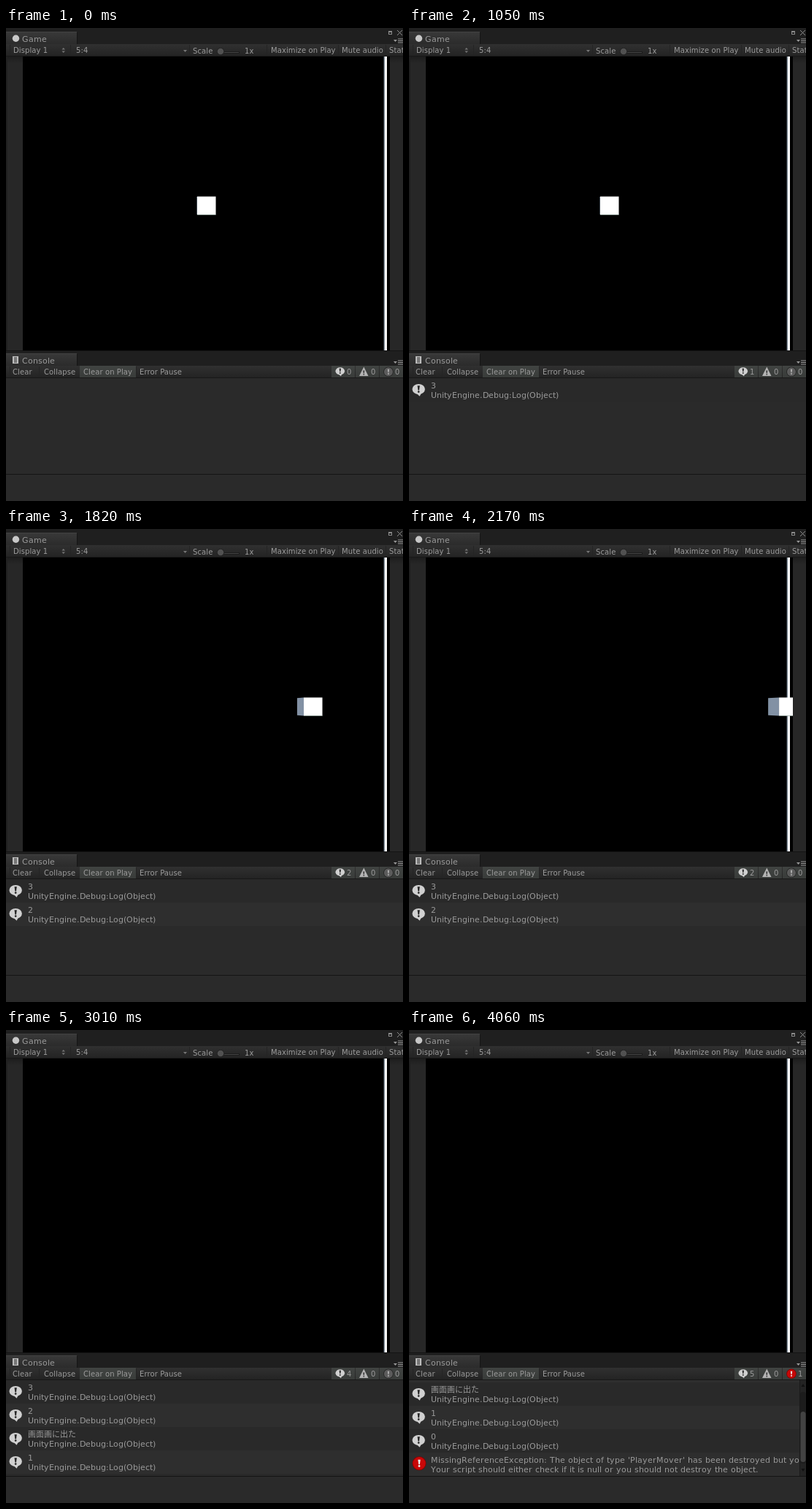
These frames come from a looping animation (544x647 px, 5320 ms). An HTML page with a canvas:

```html
<!DOCTYPE html>
<html lang="en">
<head>
<meta charset="utf-8">
<style>
html, body { margin: 0; width: 100%; height: 100%; overflow: hidden; background: #292929; }
canvas { display: block; }
</style>
</head>
<body>
<canvas id="stage" width="544" height="647"></canvas>
<script>
const g = document.getElementById('stage').getContext('2d');
const LOOP = 5320, STEP = 70;
const FONT = 'px "DejaVu Sans", "Noto Sans CJK JP", "Noto Sans CJK", sans-serif';
const LIST_TOP = 479, LIST_BOTTOM = 610, ROW = 32;
const CALL = 'UnityEngine.Debug:Log(Object)';
const LOGS = [
  { at: 1050, text: '3', more: CALL },
  { at: 1400, text: '2', more: CALL },
  { at: 2450, text: '画面画に出た', more: CALL },
  { at: 2450, text: '1', more: CALL },
  { at: 3360, text: '0', more: CALL },
  { at: 3360, error: true,
    text: "MissingReferenceException: The object of type 'PlayerMover' has been destroyed but you are still trying to access it.",
    more: 'Your script should either check if it is null or you should not destroy the object.' }
];

function box(x, y, w, h, color) {
  g.fillStyle = color;
  g.fillRect(x, y, w, h);
}

function shade(x, y, w, h, top, bottom) {
  const c = g.createLinearGradient(0, y, 0, y + h);
  c.addColorStop(0, top);
  c.addColorStop(1, bottom);
  box(x, y, w, h, c);
}

// small toolbar text
function label(s, x, y) {
  g.font = 10 + FONT;
  g.letterSpacing = '.1px';
  g.fillStyle = '#9c9c9c';
  g.fillText(s, x, y);
}

// larger text, each glyph on a whole pixel
function crisp(s, x, y) {
  g.font = 11 + FONT;
  g.letterSpacing = '0px';
  g.fillStyle = '#999';
  for (const c of s) {
    g.fillText(c, x, y);
    x += Math.round(g.measureText(c).width + .02);
  }
}

function poly(color, ...p) {
  g.fillStyle = color;
  g.beginPath();
  for (let i = 0; i < p.length; i += 2) g.lineTo(p[i], p[i + 1]);
  g.fill();
}

function oval(x, y, rx, ry, color) {
  g.fillStyle = color;
  g.beginPath();
  g.ellipse(x, y, rx, ry, 0, 0, 7);
  g.fill();
}

function bang(x, y, s, color) {
  poly(color, x - 1.7 * s, y - 5 * s, x + 1.7 * s, y - 5 * s, x + .8 * s, y + 1.5 * s, x - .8 * s, y + 1.5 * s);
  oval(x, y + 3.7 * s, 1.4 * s, 1.4 * s, color);
}

function bubble(x, y, s) {
  oval(x, y - s, 9 * s, 7.3 * s, '#d0d0d0');
  poly('#d0d0d0', x - 4 * s, y + 4 * s, x + 4 * s, y + 4 * s, x + 1.5 * s, y + 9 * s);
  bang(x, y - s, s, '#262626');
}

function alarm(x, y, r, on) {
  oval(x, y, r, r, on ? '#820000' : '#222');
  oval(x, y, r - .8, r - .8, on ? '#c80808' : '#5c5c5c');
  bang(x, y, r / 9.5, on ? '#eee' : '#b0b0b0');
}

function tab(name, y) {
  shade(0, y, 97, 17, '#393939', '#2b2b2b');
  box(0, y, 97, 1, '#424242');
  box(97, y + 1, 1, 16, '#151515');
  crisp(name, 22, y + 14);
  // panel menu
  poly('#999', 531, y + 11, 536, y + 11, 533.5, y + 14);
  for (let i = 0; i < 3; i++) box(537, y + 9.5 + i * 2.5, 7, 1, '#999');
}

function toolbar(y, ...splits) {
  shade(0, y, 544, 17, '#303030', '#232323');
  box(0, y + 16, 544, 1, '#181818');
  for (const x of splits) box(x, y + 1, 1, 15, '#242424');
}

function pressed(x, w) {
  shade(x, 462, w, 16, '#414442', '#393c3a');
}

function gamePanel() {
  box(0, 0, 544, 22, '#1f1f1f');
  tab('Game', 5);
  oval(13.5, 14.3, 4.7, 4.7, '#c8c8c8');
  g.strokeStyle = '#8a8a8a';
  g.strokeRect(524.5, 4.5, 4, 4);
  box(524, 4, 5, 2, '#8a8a8a');
  g.beginPath();
  g.moveTo(536, 3); g.lineTo(543, 10);
  g.moveTo(543, 3); g.lineTo(536, 10);
  g.stroke();

  toolbar(22, 5, 88, 251, 357, 455, 520);
  label('Display 1', 10, 34);
  poly('#777', 76.5, 29.5, 81, 29.5, 78.7, 27);
  poly('#777', 76.5, 31.5, 81, 31.5, 78.7, 34);
  label('5:4', 96, 34);
  poly('#777', 243, 30, 248, 30, 245.5, 33);
  label('Scale', 256, 35);
  box(299, 32, 21, 3, '#1b1b1b');
  box(299, 33, 20, 1, '#444');
  oval(294, 32, 5, 5, '#202020');
  oval(294, 32, 4.3, 4.3, '#515151');
  label('1x', 327, 35);
  label('Maximize on Play', 363, 34);
  label('Mute audio', 460, 34);
  label('Stats', 525, 34);

  box(0, 39, 544, 402, '#272727');
  shade(0, 39, 544, 9, '#1d1d1d', '#272727');
  box(0, 39, 2, 402, '#202020');
  box(23, 39, 503, 402, '#000');
  box(517, 39, 1, 402, '#2c3238');
  box(518, 39, 1, 402, '#7d8994');
  box(519, 39, 3, 402, '#fff');
}

function cube(t) {
  const move = Math.max(0, t - 1304) * .283;
  const x = 262 + move, back = x - .5 - move * .059;
  g.save();
  g.beginPath();
  g.rect(23, 39, 503, 402);
  g.clip();
  poly('#8291a4', x, 230.5, x, 255.5, back, 254.8, back, 231.2);
  box(x, 230.5, 25.5, 25, '#fff');
  box(x, 255, 25.5, .7, '#8fa39a');
  g.restore();
}

function consolePanel(logs) {
  const failed = logs.some(l => l.error);
  box(0, 441, 544, 21, '#1f1f1f');
  box(0, 441, 544, 1, '#141414');
  tab('Console', 445);
  box(9, 449, 8, 10, '#bdbdbd');
  for (let i = 0; i < 4; i++) box(11, 450.5 + i * 2, 4, 1, '#333');

  toolbar(462, 5, 45, 178);
  pressed(101, 77);
  label('Clear', 9, 474);
  label('Collapse', 52, 474);
  label('Clear on Play', 106, 474);
  label('Error Pause', 183, 474);
  for (const x of [446, 479, 512]) pressed(x, 32);
  bubble(457.8, 470, .7);
  poly('#b4b4b4', 490.3, 463.5, 496.5, 476, 484, 476);
  bang(490.3, 471.5, .62, '#363636');
  alarm(524, 470.3, 6.8, failed);
  label(logs.filter(l => !l.error).length, 467, 474);
  label(0, 500, 474);
  label(failed ? 1 : 0, 533, 474);

  box(0, LIST_TOP, 544, 168, '#2a2a2a');
  const bar = logs.length * ROW > LIST_BOTTOM - LIST_TOP;
  const scroll = bar ? logs.length * ROW - (LIST_BOTTOM - LIST_TOP) : 0;
  const width = bar ? 535 : 544;
  g.save();
  g.beginPath();
  g.rect(0, LIST_TOP, width, LIST_BOTTOM - LIST_TOP);
  g.clip();
  logs.forEach((l, i) => {
    const y = LIST_TOP + i * ROW - scroll;
    box(0, y, width, ROW, i % 2 ? '#2e2e2e' : '#292929');
    if (l.error) alarm(14, y + 14.8, 9.5, true);
    else bubble(13.2, y + 16, .97);
    crisp(l.text, 30, y + 14);
    crisp(l.more, 30, y + 27);
  });
  g.restore();
  if (bar) scrollbar();
  box(0, LIST_BOTTOM, 544, 1, '#141414');
}

function scrollbar() {
  box(535, LIST_TOP, 9, 131, '#232323');
  box(535, LIST_TOP, 1, 131, '#1a1a1a');
  poly('#111', 537.5, 488, 542.5, 488, 540, 484);
  poly('#111', 537.5, 600, 542.5, 600, 540, 604);
  g.fillStyle = '#1c1c1c';
  g.beginPath();
  g.roundRect(536, 495, 8, 98, 4);
  g.fill();
  g.fillStyle = '#424242';
  g.beginPath();
  g.roundRect(536.5, 522, 7, 69, 3.5);
  g.fill();
}

function draw(ms) {
  const t = Math.floor((ms % LOOP) / STEP + 1e-6) * STEP;
  gamePanel();
  cube(t);
  consolePanel(LOGS.filter(l => t >= l.at));
}

let start;
function tick(now) {
  start ??= now;
  draw(now - start);
  requestAnimationFrame(tick);
}
draw(0);
requestAnimationFrame(tick);
</script>
</body>
</html>
```
